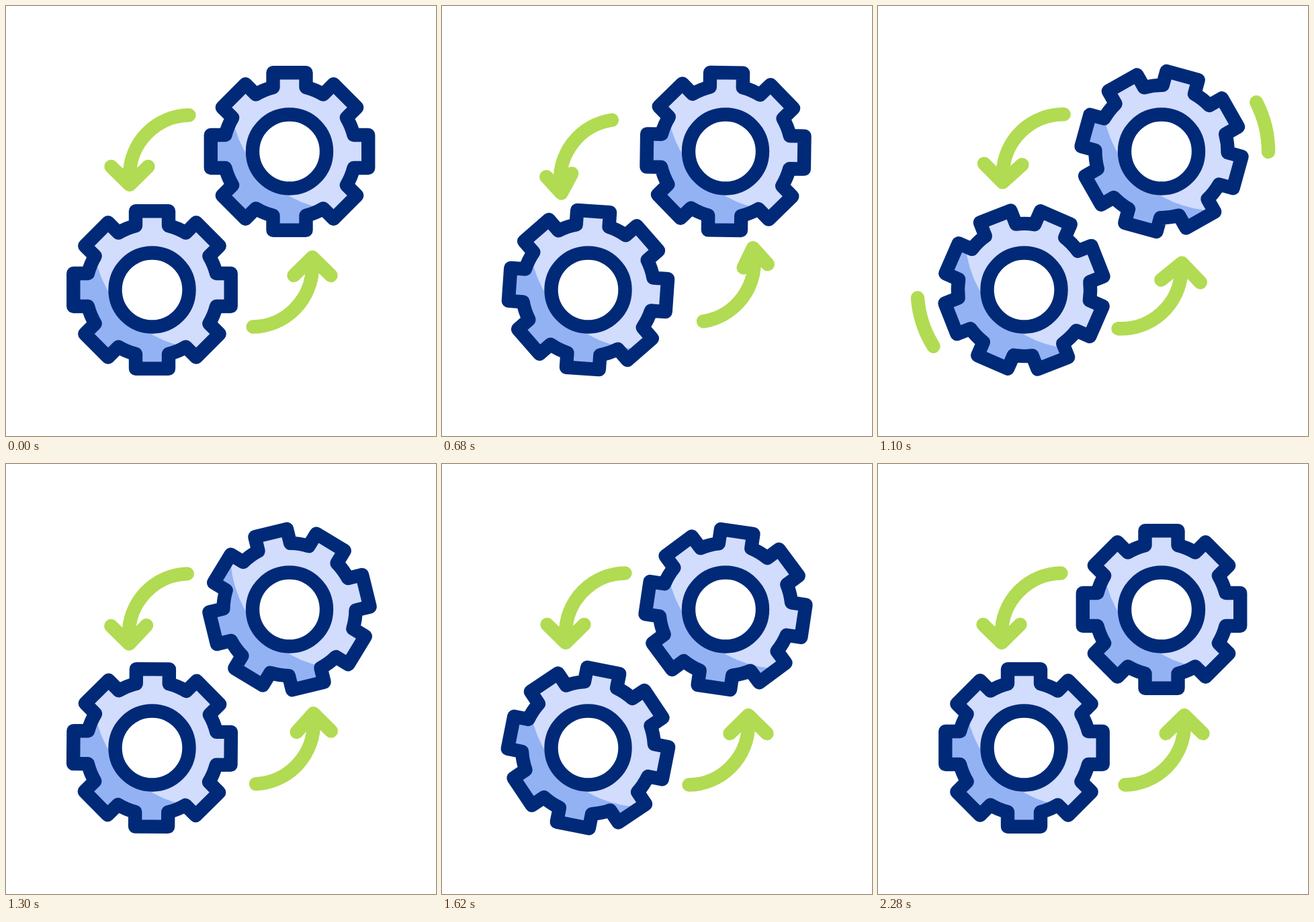
Animation, 640 px wide and 640 px high, one loop 2.6 s. Source, as an HTML page with a canvas:

```html
<!DOCTYPE html>
<html lang="en">
<head>
<meta charset="utf-8">
<title>Turning gears</title>
<style>
  html, body { margin: 0; width: 100%; height: 100%; overflow: hidden; background: #fff; }
  canvas { display: block; }
</style>
</head>
<body>
<canvas id="stage" width="640" height="640"></canvas>
<script>
const ctx = document.getElementById('stage').getContext('2d');
const LOOP = 2600, LAG = 46, DEG = Math.PI / 180;
const NAVY = '#002a77', LIGHT = '#d2dcfd', SHADE = '#93b2f4', GREEN = '#b1db52';

// Keys are [time in ms, value]; both turns wind up, overshoot and settle.
const GEAR_TURN = [[240, 0], [730, -45.5], [1505, 373], [1880, 353], [2234, 360]];
const ARROW_TURN = [[160, 0], [640, -8], [940, 6.8], [1220, -1.8], [1390, 0]];
const SWOOSH_HEAD = [[740, 222], [1160, 368]];
const SWOOSH_TAIL = [[870, 222], [1210, 368]];

function valueAt(keys, t) {
  if (t <= keys[0][0]) return keys[0][1];
  for (let i = 1; i < keys.length; i++) {
    const [t0, v0] = keys[i - 1], [t1, v1] = keys[i];
    if (t < t1) {
      const u = (t - t0) / (t1 - t0);
      return v0 + (v1 - v0) * u * u * (3 - 2 * u);
    }
  }
  return keys[keys.length - 1][1];
}

function gearPath(turn) {
  const half = 24.5, base = 95.5, top = 117.2;
  const root = Math.hypot(half, base), spread = Math.atan2(half, base);
  ctx.beginPath();
  for (let i = 0; i < 8; i++) {
    const a = (turn + i * 45) * DEG, c = Math.cos(a), s = Math.sin(a);
    const lineTo = (x, y) => ctx.lineTo(x * c - y * s, x * s + y * c);
    lineTo(-half, -base);
    lineTo(-half, -top);
    lineTo(half, -top);
    lineTo(half, -base);
    const up = a - Math.PI / 2;
    ctx.arc(0, 0, root, up + spread, up + Math.PI / 4 - spread);
  }
  ctx.closePath();
}

function circle(x, y, r) {
  ctx.beginPath();
  ctx.arc(x, y, r, 0, 2 * Math.PI);
}

function drawGear(x, y, turn) {
  ctx.save();
  ctx.translate(x, y);
  ctx.strokeStyle = NAVY;
  gearPath(turn);
  ctx.fillStyle = SHADE;
  ctx.fill();
  // The light stays put while the gear turns beneath it.
  ctx.save();
  ctx.clip();
  circle(83, -83, 171.2);
  ctx.fillStyle = LIGHT;
  ctx.fill();
  ctx.restore();
  gearPath(turn);
  ctx.stroke();
  circle(0, 0, 55);
  ctx.fillStyle = '#fff';
  ctx.fill();
  ctx.stroke();
  ctx.restore();
}

function drawArrow(side, t) {
  const turn = valueAt(ARROW_TURN, t);
  const wing = 27.5 * (1 + turn * (turn < 0 ? 0.042 : 0.018));
  const tip = 266 + Math.min(0, turn) * 0.7;
  ctx.save();
  ctx.translate(320, 320);
  ctx.rotate((side + turn) * DEG);
  ctx.translate(-320, -320);
  ctx.strokeStyle = GREEN;
  ctx.beginPath();
  ctx.arc(274, 252.5, 90, -91 * DEG, -180 * DEG, true);
  ctx.lineTo(184, tip);
  ctx.moveTo(184 - wing, tip - 27);
  ctx.lineTo(184, tip);
  ctx.lineTo(184 + wing, tip - 27);
  ctx.stroke();
  ctx.restore();
}

function drawSwoosh(x, y, offset, t) {
  const tail = valueAt(SWOOSH_TAIL, t), head = valueAt(SWOOSH_HEAD, t);
  if (head - tail < 0.5) return;
  ctx.strokeStyle = GREEN;
  ctx.beginPath();
  ctx.arc(x, y, 159, (tail + offset) * DEG, (head + offset) * DEG);
  ctx.stroke();
}

function draw(t) {
  ctx.fillStyle = '#fff';
  ctx.fillRect(0, 0, 640, 640);
  ctx.lineWidth = 20.4;
  ctx.lineCap = ctx.lineJoin = 'round';
  drawSwoosh(422, 216.5, 0, t);
  drawSwoosh(217.5, 422.5, 175.5, t);
  drawArrow(0, t);
  drawArrow(180, t - LAG);
  drawGear(422, 216.5, valueAt(GEAR_TURN, t));
  drawGear(217.5, 422.5, valueAt(GEAR_TURN, t - LAG));
}

const start = performance.now();
function tick() {
  draw((performance.now() - start) % LOOP);
  requestAnimationFrame(tick);
}
tick();
</script>
</body>
</html>
```
